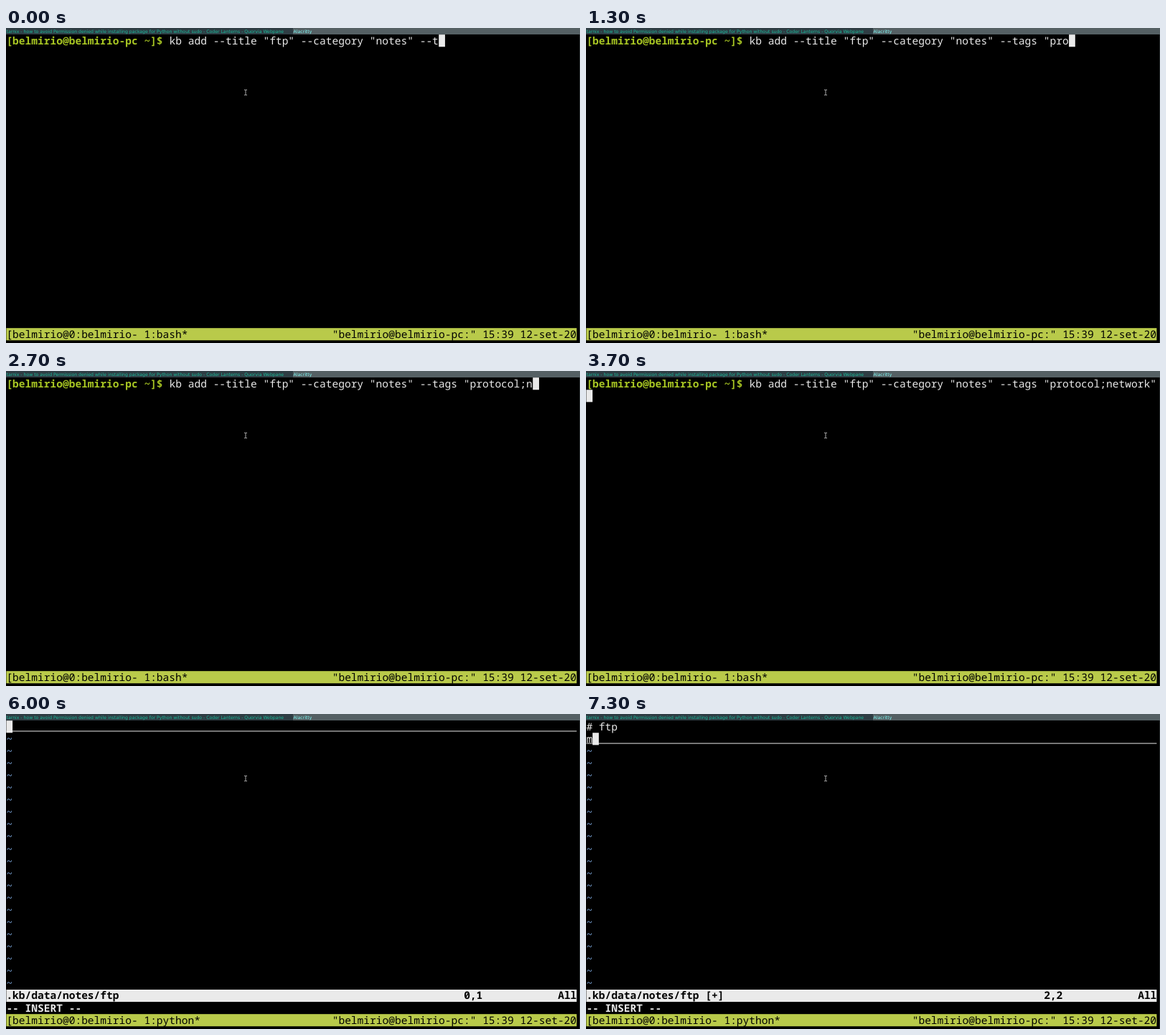
Animation, 800 px wide and 440 px high, one loop 8 s. Source, as an HTML page:

```html
<!DOCTYPE html>
<html lang="en">
<head>
<meta charset="utf-8">
<title>kb add</title>
<style>
  html, body { margin: 0; width: 100%; height: 100%; overflow: hidden; background: #000; }
  svg { display: block; width: 100vw; height: 100vh; }
  text { white-space: pre; text-rendering: geometricPrecision; }
  .term { font: 14.56px "Noto Sans Mono", "DejaVu Sans Mono", monospace; }
  .bar { font: 6.15px "DejaVu Sans", sans-serif; }
  .bold { font-weight: 700; }
</style>
</head>
<body>
<svg id="stage" viewBox="0 0 800 440"></svg>
<script>
const LOOP = 8000;
const CELL = 8.736, ROW = 17.083, LEFT = 0.4, TOP = 9.17, BASE = 13.5, COLS = 91;
const FG = '#eaeaea', GREEN = '#b9ca4a', PROMPT = '#a8c623', BLUE = '#7aa6da';
const USER = 'belmirio', HOST = USER + '-pc';
const stage = document.getElementById('stage');

function add(tag, attrs, parent = stage) {
  const el = document.createElementNS('http://www.w3.org/2000/svg', tag);
  for (const key in attrs) el.setAttribute(key, attrs[key]);
  parent.append(el);
  return el;
}
const rect = (x, y, width, height, fill, parent) => add('rect', { x, y, width, height, fill }, parent);
const colX = col => LEFT + col * CELL;
const rowY = row => TOP + row * ROW;

function label(str, col, row, fill, parent, bold) {
  const el = add('text', {
    x: colX(col), y: rowY(row) + BASE, fill, class: bold ? 'term bold' : 'term'
  }, parent);
  el.textContent = str;
  return el;
}
function setText(el, str) {
  if (el.textContent !== str) el.textContent = str;
}

// Window tabs
function tab(x, fill, color, title) {
  rect(x, 0, 400, 9, fill);
  add('text', { x: x + 0.6, y: 6.7, fill: color, class: 'bar' }).textContent = title;
}
rect(0, 0, 800, 440, '#000');
tab(0, '#2f3d44', '#1abc9c', 'tarnix - how to avoid Permission denied while installing package for Python without sudo - Coder Lanterns - Quorvia Webpane');
tab(400, '#556064', '#80fff9', 'Alacritty');
rect(799.6, 9, 0.4, 431, '#556064');

// Shell view
const shell = add('g', {});
const prompt = `[${USER}@${HOST} ~]$ `;
label(prompt, 0, 0, PROMPT, shell, true);
const command = label('', prompt.length, 0, FG, shell);

// Editor view
const editor = add('g', {});
for (let row = 1; row < 22; row++) label('~', 0, row, BLUE, editor);
const cover = rect(0, rowY(1), 20, ROW, '#000', editor);
const lines = [0, 1].map(row => label('', 0, row, FG, editor));
const underline = rect(LEFT, 0, COLS * CELL, 1, FG, editor);
rect(LEFT, rowY(22), COLS * CELL, ROW, FG, editor);
const file = label('', 0, 22, '#000', editor, true);
const ruler = label('', 73, 22, '#000', editor, true);
label('All', 88, 22, '#000', editor, true);
const opened = label('"~/.kb/data/notes/ftp" [New]', 0, 23, FG, editor);
const mode = label('-- INSERT --', 0, 23, FG, editor, true);

// Multiplexer status line
rect(LEFT, rowY(24), COLS * CELL, ROW, GREEN);
const windows = label('', 0, 24, '#000');
label(`"${USER}@${HOST}:" 15:39 12-set-20`, 52, 24, '#000');

const cursor = rect(0, 0, CELL, ROW, FG);
add('path', {
  d: 'M332 86.4h1.3l.7.5.7-.5h1.3M334 86.8v6.5M332 93.7h1.3l.7-.5.7.5h1.3',
  fill: 'none', stroke: '#d8d8d8', 'stroke-width': 0.8
});

const typedBefore = 'kb add --title "ftp" --category "notes" --t';
const commandKeys = 'ags "protocol;network"';
const commandTimes = [
  100, 300, 400, 600, 800, 1100, 1200, 1300, 1500, 1600, 1800, 1900, 2000,
  2400, 2700, 2800, 3000, 3100, 3200, 3300, 3400, 3700
];
const noteKeys = '# ftp\nm';
const noteTimes = [6200, 6300, 6600, 6800, 6900, 7100, 7300];
const OPEN = 4900, INSERT = 5600, RENAME = 5800;

const typed = (keys, times, t) => keys.slice(0, times.filter(at => at <= t).length);
const show = (el, on) => el.setAttribute('visibility', on ? 'inherit' : 'hidden');

function placeCursor(col, row) {
  cursor.setAttribute('x', colX(col));
  cursor.setAttribute('y', rowY(row));
}

function drawShell(t) {
  const str = typedBefore + typed(commandKeys, commandTimes, t);
  const pos = prompt.length + str.length;
  setText(command, str);
  placeCursor(pos % COLS, Math.floor(pos / COLS));
}

function drawEditor(t) {
  const note = typed(noteKeys, noteTimes, t);
  const parts = note.split('\n');
  const row = parts.length - 1, col = parts[row].length;
  lines.forEach((line, i) => setText(line, parts[i] || ''));
  show(cover, row > 0);
  underline.setAttribute('y', rowY(row) + 14.3);
  setText(file, '.kb/data/notes/ftp' + (note ? ' [+]' : ''));
  setText(ruler, t < INSERT ? '0,0-1' : `${note ? row + 1 : 0},${col + 1}`);
  show(opened, t < INSERT);
  show(mode, t >= INSERT);
  placeCursor(col, row);
}

function draw(t) {
  const editing = t >= OPEN;
  show(shell, !editing);
  show(editor, editing);
  (editing ? drawEditor : drawShell)(t);
  setText(windows, `[${USER}@0:${USER}- 1:${t < RENAME ? 'bash' : 'python'}*`);
}

const start = performance.now();
function tick() {
  draw((performance.now() - start) % LOOP);
  requestAnimationFrame(tick);
}
tick();
</script>
</body>
</html>
```
